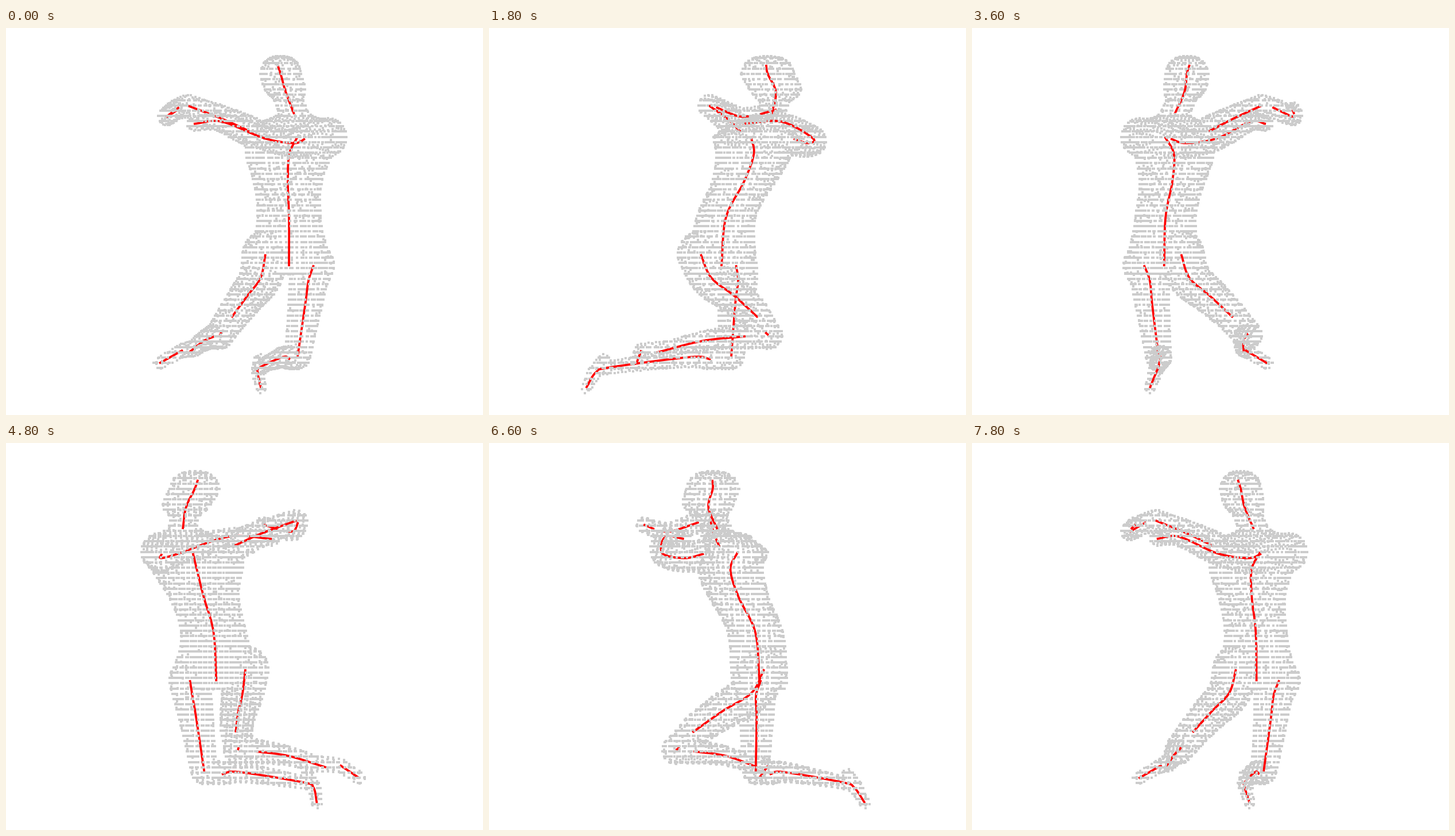
A matplotlib script for the animation above (8000 ms loop, 831 px wide and 674 px high).

```python
import numpy as np
import matplotlib.pyplot as plt
from matplotlib.animation import FuncAnimation

W, H, DPI = 831, 674, 100
FRAMES, INTERVAL = 40, 200
CELL = 9.15       # spacing of the sampling grid
GRID_TURN = 33    # degrees

# Coordinates are (a, b, y): a points right and b towards the viewer
# in the first view, y runs down the stage.


def smooth(*keys, n=10):
    """Catmull-Rom curve through the key points."""
    p = np.array(keys, float)
    p = np.vstack([2 * p[0] - p[1], p, 2 * p[-1] - p[-2]])
    t = np.linspace(0, 1, n, endpoint=False)[:, None]
    parts = []
    for p0, p1, p2, p3 in zip(p, p[1:], p[2:], p[3:]):
        parts.append(p1 + 0.5 * t * (p2 - p0 + t * (
            2 * p0 - 5 * p1 + 4 * p2 - p3 + t * (3 * (p1 - p2) + p3 - p0))))
    return np.vstack(parts + [p[-2:-1]])


head = smooth((57.5, 59, 64), (63, 61, 80), (72, 74, 112), (86.5, 64, 150))
spine = smooth((92, 27, 190), (78, 34, 220), (75.5, 17, 268),
               (77.5, -15, 330), (77.5, -23, 415))
left_arm = smooth((105.5, 100, 193), (86.5, 128, 200.5), (34.5, 145, 192),
                  (-40, 101, 163), (-88.5, 40, 167))
upper_arm = smooth((9.5, 21, 180), (-39.5, 6, 158), (-99.5, -17, 135))
forearm = smooth((-114, -2, 138), (-134, 37.5, 153), (-133, 58.6, 154))
hand = smooth((-128, 78, 150), (-116, 105, 142))
right_thigh = smooth((36.5, -53, 394), (28, -33, 435), (4.5, 12, 467),
                     (-22.5, 57, 504))
right_knee = smooth((-40.5, 73, 530), (-43, 79, 535))
right_shin = smooth((-52, 40, 537), (-70.7, -33, 545), (-96.6, -109, 565))
right_foot = smooth((-107.5, -135, 561), (-148.5, -137, 584))
left_thigh = smooth((120.5, -4, 413), (111.5, 1, 440), (106, -3, 480),
                    (92.5, -8, 572))
left_shin = smooth((79.5, -42, 577), (67, -75, 573), (27, -211, 591),
                   (23, -236, 600), (28.7, -254, 627))
curves = [head, spine, left_arm, upper_arm, forearm, hand, right_thigh,
          right_knee, right_shin, right_foot, left_thigh, left_shin]


def turn(x, z, degrees):
    c, s = np.cos(np.radians(degrees)), np.sin(np.radians(degrees))
    return x * c - z * s, x * s + z * c


q = -235 + CELL * np.arange(53)
p = -285 + CELL * np.arange(53)
y = 336 + CELL * np.arange(-34, 35)
Q, P, Y = np.meshgrid(q, p, y, indexing="ij")
A, B = turn(Q, P, GRID_TURN)


def tube(r0, r1, *paths):
    """Signed field of a tapering limb along the joined paths."""
    path = np.vstack(paths)
    path = np.vstack([path[:-1:4], path[-1]])
    steps = np.linalg.norm(np.diff(path, axis=0), axis=1)
    along = np.concatenate([[0], np.cumsum(steps)]) / steps.sum()
    radius = r0 * (r1 / r0) ** along
    field = np.full(A.shape, 1e3)
    for n0, n1, s0, s1 in zip(path, path[1:], radius, radius[1:]):
        d = n1 - n0
        va, vb, vy = A - n0[0], B - n0[1], Y - n0[2]
        t = np.clip((va * d[0] + vb * d[1] + vy * d[2]) / (d @ d), 0, 1)
        dist = np.sqrt((va - t * d[0])**2 + (vb - t * d[1])**2
                       + (vy - t * d[2])**2)
        field = np.minimum(field, dist - s0 - t * (s1 - s0))
    return field


def around_spine(degrees, level):
    """Horizontal offsets from the head-and-spine line at a level."""
    line = np.vstack([head, spine])
    ca, cb = (np.interp(level, line[:, 2], line[:, k]) for k in (0, 1))
    return turn(A - ca, B - cb, -degrees)


def bump(center, width):
    return np.exp(-((Y - center) / width)**2)


def skull(power=2.5):
    u, v = around_spine(-5, np.maximum(Y, 80))
    parts = (u / 36, v / 47, (Y - 90) / 41)
    return 36 * (sum(np.abs(k)**power for k in parts)**(1 / power) - 1)


def torso():
    u, v = around_spine(27, Y)
    rise = np.clip((190 - Y) / 42, 0, 0.998)
    dome = np.sqrt(1 - rise**2)
    wide = (56 + 30 * bump(195, 55) + 17 * bump(400, 40)) * dome
    deep = (48 + 8 * bump(225, 55)) * dome
    field = (np.hypot(u / wide, v / deep) - 1) * np.minimum(wide, deep)
    return np.maximum(field, np.maximum(148 - Y, Y - 428))


def surface(field):
    """Points where the surface cuts the edges of the grid."""
    found = []
    for axis, n in enumerate(field.shape):
        f0 = field.take(range(n - 1), axis)
        f1 = field.take(range(1, n), axis)
        cut = (f0 < 0) != (f1 < 0)
        pos = np.argwhere(cut).astype(float)
        pos[:, axis] += f0[cut] / (f0[cut] - f1[cut])
        found.append(pos)
    gq, gp, gy = (np.vstack(found) * CELL + (q[0], p[0], y[0])).T
    return np.column_stack([*turn(gq, gp, GRID_TURN), gy])


shoulder = (145, 50, 190)
heel = smooth((26, -222, 577), (25, -240, 602))
cloud = surface(np.minimum.reduce([
    skull(),
    torso(),
    tube(24, 24, head[15:]),
    tube(33, 12, shoulder, left_arm),
    tube(26, 13, upper_arm, forearm, hand),
    tube(40, 24, right_thigh, right_knee),
    tube(24, 10, right_knee, right_shin, right_foot),
    tube(36, 22, left_thigh),
    tube(22, 9, left_thigh[-1:], left_shin),
    tube(10, 12, heel),
]))
samples = np.vstack(curves)


def project(pts, angle):
    """Stage x, stage y and nearness of each point."""
    c, s = np.cos(angle), np.sin(angle)
    a, b, row = pts.T
    return W / 2 + a * c + b * s, row, b * c - a * s


fig = plt.figure(figsize=(W / DPI, H / DPI), dpi=DPI, facecolor="white")
ax = fig.add_axes([0, 0, 1, 1])
ax.set(xlim=(0, W), ylim=(H, 0))
ax.axis("off")

px = 72 / DPI
dots = dict(ls="", marker="s", ms=3.6 * px, mew=0, color="#cccccc")
back, = ax.plot([], [], zorder=1, **dots)
front, = ax.plot([], [], zorder=3, **dots)
lines = [ax.plot([], [], color="red", lw=3.8 * px, zorder=2,
                 solid_capstyle="butt")[0] for _ in curves]


def update(i):
    angle = 2 * np.pi * i / FRAMES
    x, row, near = project(cloud, angle)
    sx, sy, snear = project(samples, angle)
    closest = np.argmin((x[:, None] - sx)**2 + (row[:, None] - sy)**2, axis=1)
    ahead = near > snear[closest]
    back.set_data(x[~ahead], row[~ahead])
    front.set_data(x[ahead], row[ahead])
    for line, curve in zip(lines, curves):
        line.set_data(*project(curve, angle)[:2])
    return [back, front, *lines]


anim = FuncAnimation(fig, update, frames=FRAMES, interval=INTERVAL,
                     repeat=True, repeat_delay=0)
plt.show()
```
